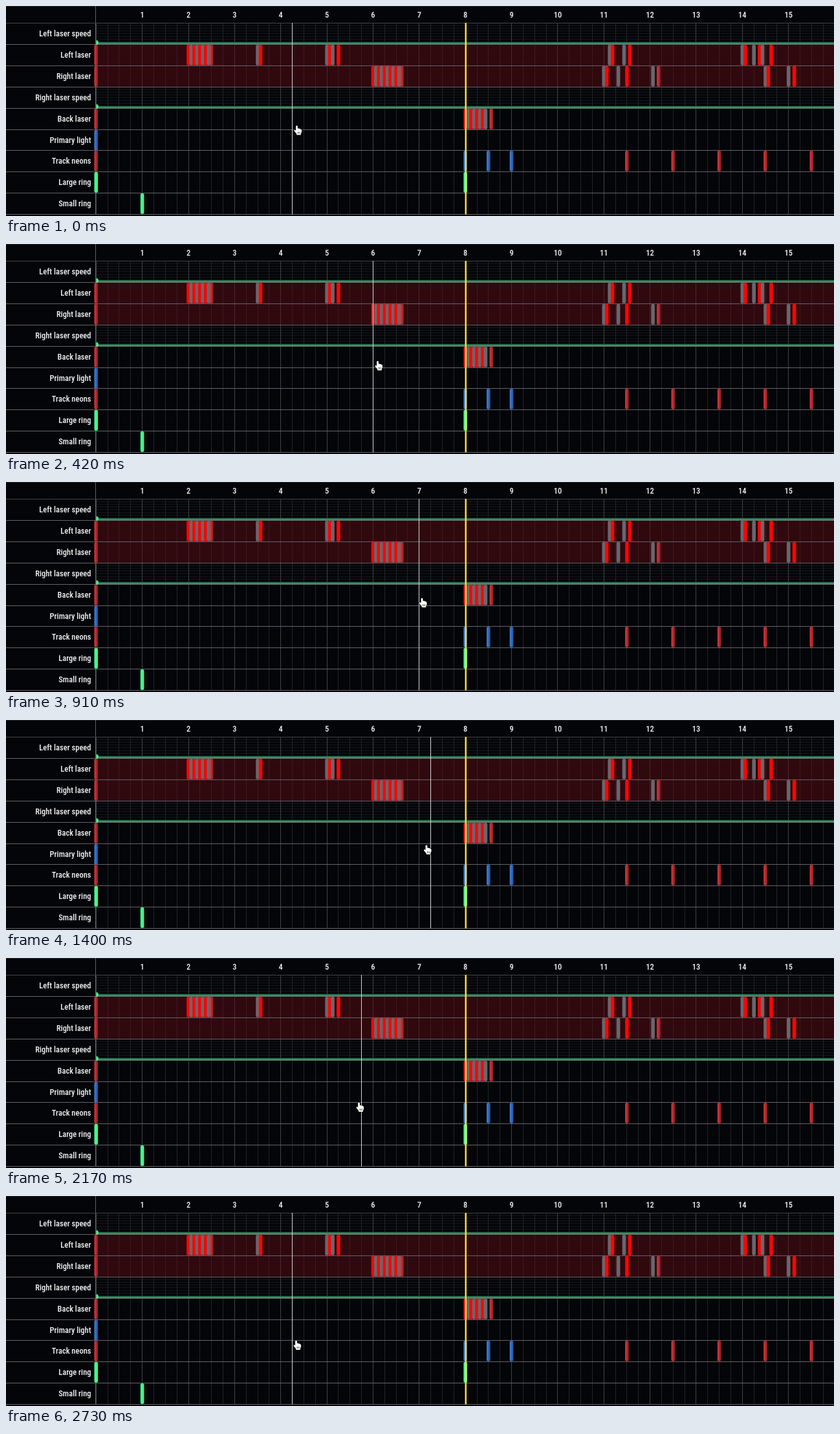
An HTML page with a canvas for the animation above (2.8 s loop, 1280 by 325 pixels).

```html
<!DOCTYPE html>
<html lang="en">
<head>
<meta charset="utf-8">
<title>Lighting event grid</title>
<style>
html, body { margin: 0; width: 100%; height: 100%; overflow: hidden; background: #040508; }
canvas { display: block; font-stretch: condensed; }
</style>
</head>
<body>
<canvas id="stage" width="1280" height="325"></canvas>
<script>
const ctx = document.getElementById('stage').getContext('2d');
const LOOP = 2800, STEP = 70, LAG = 50;
const LEFT = 139.3, BEAT = 71.36, TOP = 26.5, ROW = 32.9, BOTTOM = 322.5;
const FONT = '"Roboto Condensed", "Liberation Sans Narrow", Roboto, sans-serif';
const beatX = b => LEFT + b * BEAT;
const rowY = i => Math.round(TOP + i * ROW - .5);

// r: red, o: off, f: red fade, b: blue fade, g: ring; each event is a kind and a beat
const flicker = (from, n, end) => [
  ...Array.from({ length: n }, (_, i) => (i % 2 ? 'o' : 'r') + (from + i / 16)), 'f' + end];
const list = s => s.split(' ');
const rows = [
  ['Left laser speed', []],
  ['Left laser', ['f0', ...flicker(2, 8, 2.5), ...list(
    'o3.5 r3.5625 o5 r5.0625 o5.125 r5.25 o11.125 r11.1875 o11.4375 r11.5625 ' +
    'o14 r14.0625 o14.25 r14.375 o14.4375 r14.625')]],
  ['Right laser', ['f0', ...flicker(6, 10, 6.625), ...list(
    'o11 r11.0625 o11.3125 r11.5 o12.0625 f12.1875 o14.5 r14.5625 o15 r15.125')]],
  ['Right laser speed', []],
  ['Back laser', ['f0', ...flicker(8, 8, 8.5625)]],
  ['Primary light', ['b0']],
  ['Track neons', list('f0 b8 b8.5 b9 f11.5 f12.5 f13.5 f14.5 f15.5')],
  ['Large ring', ['g0', 'g8']],
  ['Small ring', ['g1']]
];
const colors = {
  r: ['#fb0505', '#fb0505'], o: ['#66686e', '#66686e'], f: ['#df383c', '#861e23'],
  b: ['#3f82dc', '#26519a'], g: ['#45f58e', '#45f58e']
};

// pointer path: time, x, y of the fingertip
const path = [[0, 449.5, 185.5], [420, 574.5, 181.5], [910, 643, 180], [1400, 650, 194],
  [1750, 624.5, 219], [2170, 545.5, 224], [2730, 448.5, 224]];

function slope(i, k) {
  const a = path[i - 1], b = path[i + 1];
  return a && b ? (b[k] - a[k]) / (b[0] - a[0]) : 0;
}
function along(t, k) {
  t = Math.max(0, Math.min(t, 2730));
  let i = 0;
  while (i < path.length - 2 && t > path[i + 1][0]) i++;
  const p = path[i], q = path[i + 1], h = q[0] - p[0], u = (t - p[0]) / h, v = 1 - u;
  return p[k] * v * v * (1 + 2 * u) + q[k] * u * u * (3 - 2 * u)
    + h * u * v * (slope(i, k) * v - slope(i + 1, k) * u);
}

function rect(x, y, w, h, color) {
  ctx.fillStyle = color;
  ctx.fillRect(x, y, w, h);
}
function text(s, x, y, align) {
  ctx.textAlign = align;
  ctx.fillText(s, x, y);
}
function block(kind, beat, y) {
  const x = beatX(beat) - 2.8, fill = ctx.createLinearGradient(x, 0, x + 5.6, 0);
  colors[kind].forEach((c, i) => fill.addColorStop(i, c));
  ctx.fillStyle = fill;
  ctx.beginPath();
  ctx.roundRect(x, y + 1, 5.6, ROW - 1.2, 2);
  ctx.fill();
}

function grid() {
  rect(0, 0, 1280, 325, '#040508');
  rect(0, 0, 1280, 1, '#242529');
  for (const i of [0, 3])
    for (let j = 1; j < 8; j++) rect(139, Math.round(rowY(i) + j * ROW / 8), 1141, 1, '#15171a');
  for (let i = 0; i < 64; i++)
    rect(Math.round(beatX(i / 4) - .5), 26, 1, 297, i % 4 ? '#222428' : '#414348');
  rect(139, rowY(1), 1141, 2 * ROW, 'rgba(92, 14, 20, .5)');
  rect(138, 0, 1, 323, '#606268');
  for (let i = 0; i < 10; i++) rect(0, rowY(i), 1280, 1, i ? '#62646a' : '#414347');
  for (const i of [1, 4]) {
    const y = rowY(i);
    rect(139, y - 3, 1141, 3, '#287b50');
    rect(139, y - 1, 1141, 1, '#45a373');
    ctx.fillStyle = '#45f58e';
    ctx.beginPath();
    ctx.arc(139.5, y - 2.5, 3.5, -Math.PI / 2, Math.PI / 2);
    ctx.fill();
  }
}

function labels() {
  ctx.fillStyle = '#f0f0f2';
  ctx.textBaseline = 'middle';
  ctx.fontStretch = 'condensed';
  ctx.font = '500 12.5px ' + FONT;
  for (let i = 1; i < 16; i++) text(i, beatX(i), 14, 'center');
  rows.forEach(([name], i) => text(name, 131.5, rowY(i) + ROW / 2 + 1, 'right'));
}

const hand = new Path2D('M-1.4 .9Q-1.4-.5 0-.5T1.5 .9V4.6Q3-.2 0 0M-1.4 1V7.3' +
  'L-2.4 6.3Q-4-.1-4 6.4Q-4.2 7.2-3.5 8L-.4 12V14H6.2V12Q7.6 10.2 7.6 8V6.2' +
  'Q7.4 4.9 6.2 5.2Q5.7 4 4.3 4.4Q3.4 3.5 1.5 4V1Q1.4-.5 0-.5T-1.4 1Z');
const palm = new Path2D('M-1.4 1Q-1.4-.5 0-.5T1.4 1V4.2Q2.8 3.4 3.7 4.5Q5.2 3.9 5.8 5.2' +
  'Q7.5 4.9 7.5 6.7V8.5Q7.5 10.5 6.3 12V14H-.3V12.2L-3.7 8.2Q-4.4 7-3.5 6.4T-1.4 7.4Z');
const knuckles = new Path2D('M1.4 9.2V12M3.1 9.2V12M4.8 9.2V12');

function pointer(x, y) {
  ctx.save();
  ctx.translate(x, y);
  ctx.lineWidth = 1.2;
  ctx.strokeStyle = '#08090c';
  ctx.stroke(palm);
  ctx.fillStyle = '#fff';
  ctx.fill(palm);
  ctx.lineWidth = .6;
  ctx.stroke(knuckles);
  ctx.restore();
}

function draw(now) {
  const t = Math.floor(now % LOOP / STEP) * STEP;
  grid();
  labels();
  rows.forEach(([, events], i) => events.forEach(e => block(e[0], +e.slice(1), rowY(i))));
  const snapped = Math.round((along(t - LAG, 1) - LEFT) / BEAT * 4) / 4;
  rect(Math.round(beatX(snapped) - .5), 26, 1, BOTTOM - 26, '#d6d6d8');
  rect(709.5, 26, 2.5, BOTTOM - 26, '#fbd83a');
  pointer(along(t, 1), along(t, 2));
}

let start;
function tick(now) {
  start ??= now;
  draw(now - start);
  requestAnimationFrame(tick);
}
draw(0);
requestAnimationFrame(tick);
</script>
</body>
</html>
```
